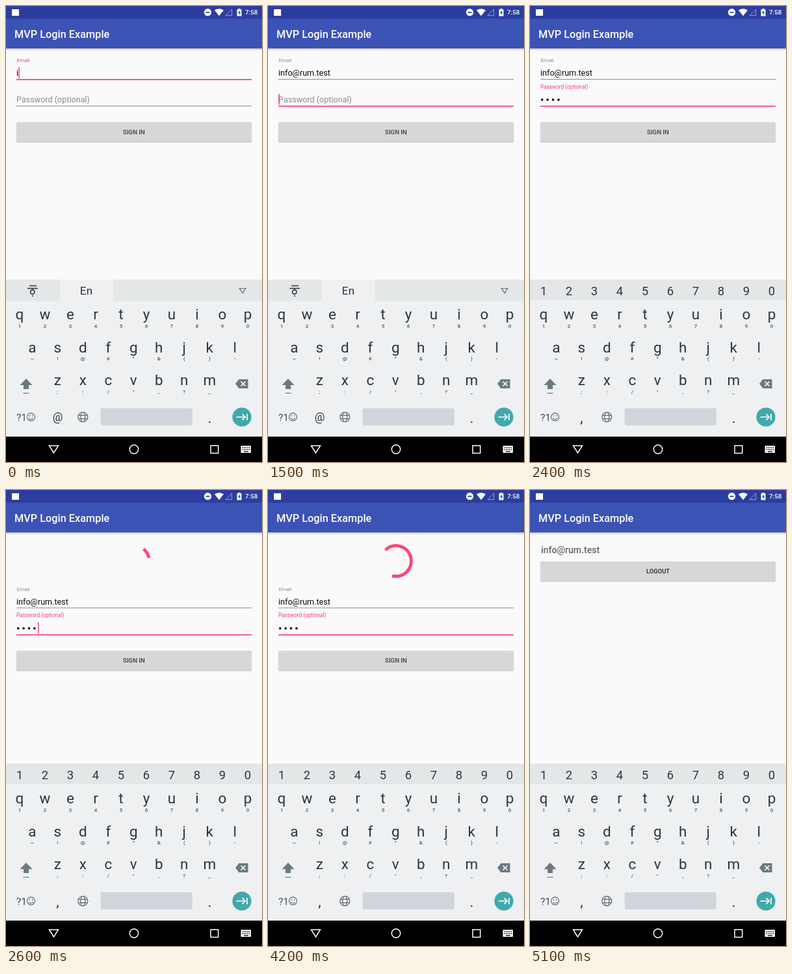
Write an HTML page that moves like this. It is 394 px wide and 700 px high and loops after 5200 ms.

```html
<!DOCTYPE html>
<html lang="en">
<head>
<meta charset="utf-8">
<title>Login example</title>
<style>
html, body { margin: 0; width: 100%; height: 100%; overflow: hidden; background: #fafafa; }
svg { display: block; width: 394px; height: 700px; font-family: Roboto, sans-serif; }
.mid { text-anchor: middle; }
.med { font-weight: 500; }
.key { font-size: 22.5px; fill: #2b363b; text-anchor: middle; }
.num { font-size: 18.5px; fill: #2b363b; text-anchor: middle; }
.sub { font-size: 8px; font-weight: 500; fill: #50595e; text-anchor: middle; }
.body { font-size: 12.6px; fill: #0c0c0c; }
.line { fill: none; stroke: #fff; }
.icon { fill: none; stroke: #5f6c72; stroke-width: 1.2; }
</style>
</head>
<body>
<svg viewBox="0 0 394 700">
  <defs>
    <linearGradient id="shade" x2="0" y2="1">
      <stop stop-color="#000" stop-opacity=".28"/>
      <stop offset=".5" stop-color="#000" stop-opacity=".08"/>
      <stop offset="1" stop-color="#000" stop-opacity="0"/>
    </linearGradient>
    <g id="button">
      <rect x="15.5" y="1" width="363" height="30.7" rx="2" fill="#000" opacity=".08"/>
      <rect x="16" y="1" width="362" height="30" rx="2" fill="#000" opacity=".14"/>
      <rect x="16" width="362" height="30" rx="1.5" fill="#d6d7d7"/>
    </g>
  </defs>
  <rect width="394" height="700" fill="#fafafa"/>

  <rect width="394" height="20" fill="#2d3d9f"/>
  <rect y="19.5" width="394" height="45.5" fill="#3c53b6"/>
  <rect y="65" width="394" height="4" fill="url(#shade)"/>
  <rect x="9" y="5" width="11" height="10" fill="#fff"/>
  <text class="med" x="13" y="49" font-size="16.3" fill="#fff">MVP Login Example</text>
  <g fill="#fff">
    <circle cx="310.5" cy="9.7" r="5.6"/>
    <rect x="307.5" y="8.9" width="6" height="1.7" fill="#2d3d9f"/>
    <path d="M321 6.6Q328 1.8 335 6.6L328 15.2Z"/>
    <path d="M338 14.7L347.6 5V14.7Z" class="line" opacity=".5"/>
    <path d="M355.5 5.2H357.5V4H360.5V5.2H362.5V15.6H355.5Z"/>
    <path d="M359.6 6.5L357 10.8H358.8V14L361.2 9.7H359.6Z" fill="#2d3d9f"/>
    <text class="med" x="368" y="13.4" font-size="9.9">7:58</text>
  </g>

  <g id="form">
    <text id="mailTag" x="16.5" y="86" font-size="8.1">Email</text>
    <text id="mail" class="body" x="16" y="107.3"></text>
    <rect id="mailLine" x="16" width="362"/>
    <text id="passTag" x="16"></text>
    <g id="dots" fill="#0c0c0c"></g>
    <rect id="passLine" x="16" width="362"/>
    <rect id="caret" width="1.5" height="17" fill="#f93f76"/>
    <use href="#button" y="178.2"/>
    <text class="mid med" x="197" y="196.6" font-size="9.6" fill="#3e3e3e">SIGN IN</text>
  </g>
  <path id="spin" fill="none" stroke="#ff4678" stroke-width="5"/>
  <g id="home">
    <text id="who" class="med" x="17" y="97.3" font-size="14.1" fill="#666"></text>
    <use href="#button" y="109.6"/>
    <text class="mid med" x="197" y="128.3" font-size="9.4" fill="#222">LOGOUT</text>
  </g>

  <rect y="420" width="394" height="241" fill="#eef0f2"/>
  <g id="langs">
    <path d="M0 420H83V452.5H0ZM165 420H394V452.5H165Z" fill="#e4e7e8"/>
    <path d="M36 429.500H47M33 433.500H49M41 433.500V436" fill="none" stroke="#2b363b" stroke-width="1.4"/>
    <circle cx="40.800" cy="439" r="3.200" fill="none" stroke="#2b363b" stroke-width="1.4"/>
    <circle cx="41" cy="445" r="1.1" fill="#2b363b"/>
    <text class="mid" x="123.500" y="443.2" font-size="17.2" fill="#2b363b">En</text>
    <path class="icon" d="M359.5 433.5H368.8L364.2 440.8Z"/>
    <text class="mid" x="79.5" y="637" font-size="17.5" fill="#2b363b">@</text>
  </g>
  <g id="nums">
    <rect y="420" width="394" height="32" fill="#e4e7e8"/>
    <rect y="452" width="394" height="1" fill="#f6f8f9"/>
    <text class="key" x="79.5" y="639">,</text>
  </g>
  <g id="keys"></g>
  <g fill="#6b7a80">
    <path d="M31 572L40.5 582H35V588H27V582H21.500Z"/>
    <rect x="26.5" y="593.8" width="9" height="1.2"/>
    <path d="M353 580L358.500 573H372.500V587H358.500Z"/>
    <path d="M361.500 576.5L368.500 583.5M368.500 576.5L361.500 583.5" class="line" stroke-width="1.6"/>
  </g>
  <text x="16" y="637" font-size="15.5" fill="#414d53">?1</text>
  <g class="icon">
    <circle cx="38.5" cy="630.8" r="6"/>
    <path d="M35.300 632.500Q38.500 636.500 41.700 632.500M36.300 628V630M40.700 628V630"/>
    <circle cx="118.300" cy="631" r="7.500"/>
    <ellipse cx="118.300" cy="631" rx="3.500" ry="7.500"/>
    <path d="M111.500 628.300H125.100M111.500 633.700H125.100"/>
  </g>
  <rect x="145.700" y="617.600" width="141" height="26.200" rx="2.500" fill="#d1d4da"/>
  <text class="key" x="313.5" y="639.5">.</text>
  <circle cx="363" cy="631" r="14.6" fill="#41a9ab"/>
  <path class="line" stroke-width="1.7" d="M354.500 631H368M363.500 626.300L368.200 631L363.500 635.700M371 626V636"/>

  <rect y="661" width="394" height="39" fill="#000"/>
  <g class="line" stroke-width="1.5">
    <path d="M66.500 675H80.500L73.500 686Z"/>
    <circle cx="197" cy="680.500" r="6.700"/>
    <rect x="315" y="674.800" width="11.700" height="11.700"/>
  </g>
  <rect x="361.500" y="675" width="15.500" height="11" rx="1" fill="#fff"/>
  <path d="M363.500 678H375.500M363.500 681H375.500" stroke="#000" stroke-width="1.4" stroke-dasharray="1.4 1.2"/>
  <path d="M366 684H373" stroke="#000" stroke-width="1.3"/>
</svg>
<script>
const LOOP = 5200, STEP = 100, SPIN = 1333;
const ADDRESS = 'info@rum.test';
const PINK = '#f93f76', GREY = '#8c8c8c';
const el = id => document.getElementById(id);

function add(parent, tag, attrs, text = '') {
  const node = document.createElementNS('http://www.w3.org/2000/svg', tag);
  set(node, attrs);
  node.textContent = text;
  parent.append(node);
}
function set(node, attrs) {
  for (const name in attrs) node.setAttribute(name, attrs[name]);
}
const show = (id, on) => set(el(id), { visibility: on ? 'visible' : 'hidden' });

function keyRow(x, y, letters, marks) {
  [...letters].forEach((c, i) => {
    const cx = x + i * 39;
    add(el('keys'), 'text', { class: 'key', x: cx, y }, c);
    add(el('keys'), 'text', { class: 'sub', x: cx, y: y + 12.8 }, marks[i]);
  });
}
keyRow(21, 481, 'qwertyuiop', '1234567890');
keyRow(40.3, 531.6, 'asdfghjkl', '~!@#^&()-');
keyRow(79.3, 582.2, 'zxcvbnm', ';:/",?_');
[...'1234567890'].forEach((c, i) =>
  add(el('nums'), 'text', { class: 'num', x: 21 + i * 39, y: 444 }, c));
for (let i = 0; i < 4; i++)
  add(el('dots'), 'circle', { cx: 18.7 + i * 8.4, cy: 143.9, r: 1.8 });
el('passTag').textContent = 'Password (optional)';
el('who').textContent = ADDRESS;

const clamp = v => Math.min(1, Math.max(0, v));

// Ease whose control points sit at x0..x3 with y = 0, 0, 1, 1.
function ease(x, x0, x1, x2, x3) {
  if (x <= x0) return 0;
  if (x >= x3) return 1;
  let lo = 0, hi = 1, u = 0;
  for (let i = 0; i < 24; i++) {
    u = (lo + hi) / 2;
    const v = 1 - u;
    const at = v * v * v * x0 + 3 * v * v * u * x1 + 3 * v * u * u * x2 + u * u * u * x3;
    if (at < x) lo = u; else hi = u;
  }
  return u * u * (3 - 2 * u);
}

function arc(age) {
  const turns = age / SPIN, p = turns % 1;
  const base = 7 + 90 * p + 216 * turns;
  const from = base + 270 * ease(p, .5, .7, .6, 1);
  const to = base + 270 * ease(p, 0, .2, .1, .5) + 1;
  const point = deg => {
    const a = deg * Math.PI / 180;
    return `${197 + 23.5 * Math.sin(a)} ${109 - 23.5 * Math.cos(a)}`;
  };
  return `M${point(from)}A23.5 23.5 0 ${to - from > 180 ? 1 : 0} 1 ${point(to)}`;
}

function underline(id, y, focused) {
  set(el(id), { y, height: focused ? 1.7 : 1, fill: focused ? PINK : GREY });
}

function draw(t) {
  const onPass = t >= 1400, busy = t >= 2600 && t < 5000, done = t >= 5000;
  const secure = t >= 1600;

  el('mail').textContent = ADDRESS.slice(0, onPass ? ADDRESS.length : 1 + Math.floor(t / 115));
  set(el('mailTag'), { fill: onPass ? GREY : PINK });
  underline('mailLine', 112, !onPass);
  underline('passLine', 153, onPass);

  const f = ease(clamp((t - 1550) / 250), 0, .4, .2, 1);
  set(el('passTag'), {
    y: 147.5 - 20.7 * f,
    'font-size': 12.6 - 4.4 * f,
    fill: secure ? PINK : GREY
  });
  const count = Math.min(4, Math.max(0, Math.floor((t - 1500) / 100)));
  [...el('dots').children].forEach((dot, i) => set(dot, { opacity: i < count ? 1 : 0 }));

  const blink = t < 2200 || (t >= 2600 && t < 3000) || (t >= 3500 && t < 4000);
  set(el('caret'), {
    x: onPass ? 16.2 + count * 8.2 : 16.2 + el('mail').getComputedTextLength(),
    y: onPass ? 134.7 : 94,
    opacity: blink ? 1 : 0
  });

  set(el('form'), { transform: `translate(0 ${busy ? 68.5 : 0})` });
  if (busy) set(el('spin'), { d: arc(t - 2463) });
  show('form', !done);
  show('spin', busy);
  show('home', done);
  show('nums', secure);
  show('langs', !secure);
}

function tick() {
  const t = performance.now() % LOOP;
  draw(Math.floor(t / STEP) * STEP);
  requestAnimationFrame(tick);
}
tick();
</script>
</body>
</html>
```
